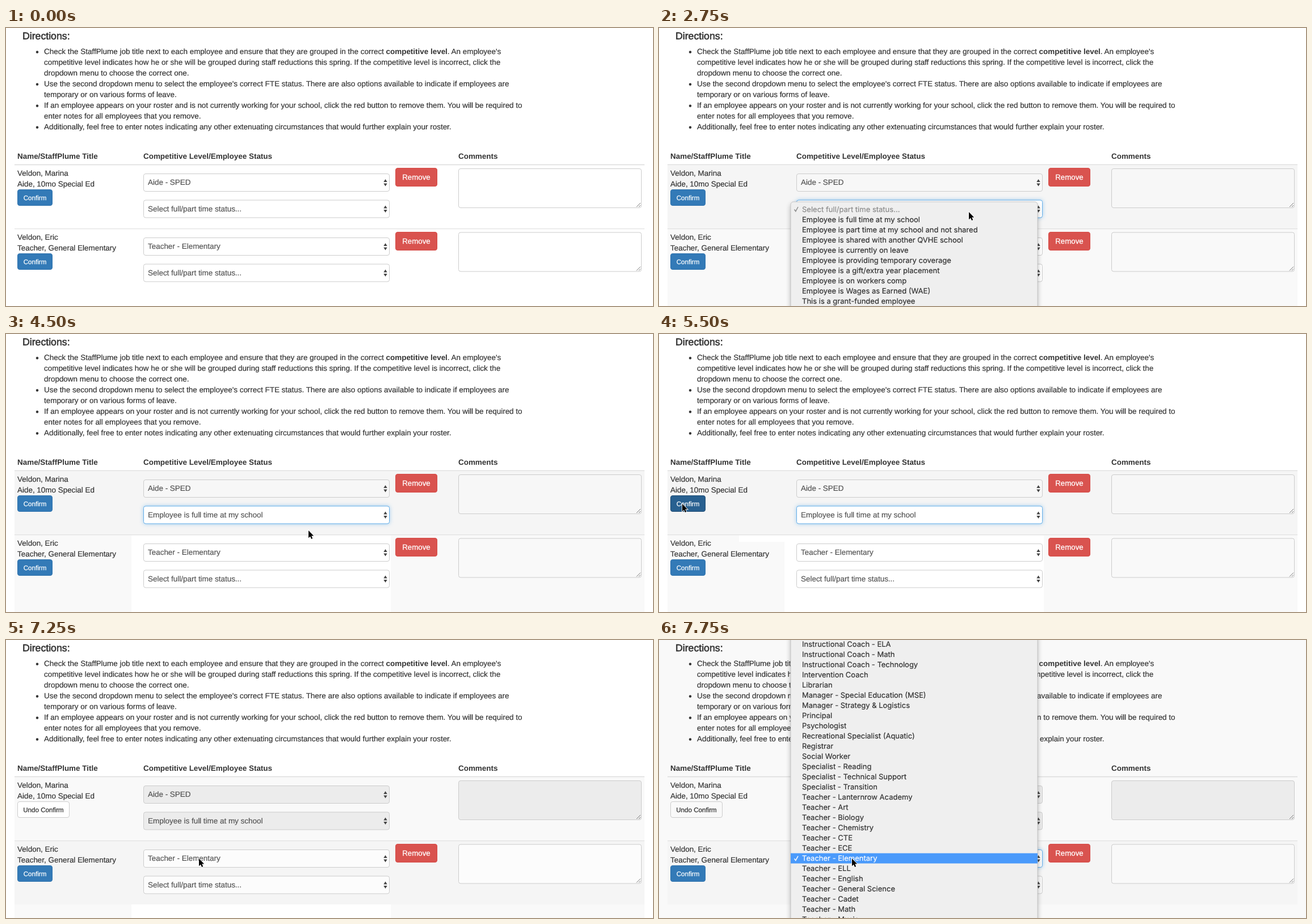
An HTML page for the animation above (8000 ms loop, 1140 by 491 pixels).

```html
<!DOCTYPE html>
<html lang="en">
<head>
<meta charset="utf-8">
<title>Roster review</title>
<style>
  html, body { margin: 0; width: 100%; height: 100%; overflow: hidden; background: #fff; }
  svg { display: block; width: 1140px; height: 491px; }
  text {
    font: 13.44px "Liberation Sans", Arial, sans-serif; white-space: pre; text-rendering: geometricPrecision;
    color: #333; fill: currentColor; stroke: currentColor; stroke-width: .2px;
  }
  .bold { font-weight: 700; stroke-width: 0; }
  .title { font-size: 17.7px; stroke-width: .6px; }
  .field { color: #555; }
  .button { font-size: 13.3px; stroke-width: .3px; }
  .small { font-size: 11.6px; stroke-width: .25px; }
  .option { font: 13px Inter, Roboto, sans-serif; }
</style>
</head>
<body>
<svg id="stage" viewBox="0 0 1140 491" xmlns="http://www.w3.org/2000/svg">
  <defs>
    <filter id="glow" x="-10%" y="-100%" width="120%" height="300%"><feGaussianBlur stdDeviation="3.5"/></filter>
    <filter id="shade" x="-10%" y="-10%" width="120%" height="120%"><feGaussianBlur stdDeviation="5"/></filter>
  </defs>
  <g id="scene"></g>
  <g id="pointer">
    <path d="M0 0V13.2L3 10.4 5 15 7.2 14 5.2 9.6H9.2Z" fill="#000" stroke="#fff" stroke-width="1.6" paint-order="stroke"/>
  </g>
</svg>
<script>
const LOOP = 8000, STEP = 250;
const scene = document.getElementById('scene');
const pointer = document.getElementById('pointer');

const directions = [
  '*Check the StaffPlume job title next to each employee and ensure that they are grouped in the correct <tspan class="bold">competitive level</tspan>. An employee\'s',
  'competitive level indicates how he or she will be grouped during staff reductions this spring. If the competitive level is incorrect, click the',
  'dropdown menu to choose the correct one.',
  '*Use the second dropdown menu to select the employee\'s correct FTE status. There are also options available to indicate if employees are',
  'temporary or on various forms of leave.',
  '*If an employee appears on your roster and is not currently working for your school, click the red button to remove them. You will be required to',
  'enter notes for all employees that you remove.',
  '*Additionally, feel free to enter notes indicating any other extenuating circumstances that would further explain your roster.'
];

const UNSET = 'Select full/part time status...';
const FULL_TIME = 'Employee is full time at my school';
const statuses = [
  UNSET, FULL_TIME,
  'Employee is part time at my school and not shared',
  'Employee is shared with another QVHE school',
  'Employee is currently on leave',
  'Employee is providing temporary coverage',
  'Employee is a gift/extra year placement',
  'Employee is on workers comp',
  'Employee is Wages as Earned (WAE)',
  'This is a grant-funded employee'
];
const subjects = ['Lanternrow Academy', 'Art', 'Biology', 'Chemistry', 'CTE', 'ECE', 'Elementary',
  'ELL', 'English', 'General Science', 'Cadet', 'Math', 'Music'];
const levels = [
  'Instructional Coach - ELA', 'Instructional Coach - Math', 'Instructional Coach - Technology',
  'Intervention Coach', 'Librarian', 'Manager - Special Education (MSE)',
  'Manager - Strategy &amp; Logistics', 'Principal', 'Psychologist',
  'Recreational Specialist (Aquatic)', 'Registrar', 'Social Worker', 'Specialist - Reading',
  'Specialist - Technical Support', 'Specialist - Transition',
  ...subjects.map(name => 'Teacher - ' + name)
];
const CHOSEN_LEVEL = levels.indexOf('Teacher - Elementary');

// [start ms, tip x, tip y]
const pointerStops = [
  [750, 603, 120], [1000, 551, 304], [1250, 546, 325], [3500, 537, 336], [3750, 533, 347],
  [4750, 394, 350], [5000, 143, 343], [5250, 50, 307], [5500, 41, 300], [6250, 51, 300],
  [6500, 198, 297], [6750, 310, 326], [7000, 338, 380], [7250, 340, 386]
];

const rect = (x, y, w, h, fill, more = '') =>
  `<rect x="${x}" y="${y}" width="${w}" height="${h}" fill="${fill}" ${more}/>`;
const box = (x, y, w, h, fill, stroke) =>
  rect(x + .5, y + .5, w - 1, h - 1, fill, `rx="3.5" stroke="${stroke}"`);
const label = (x, y, text, cls = '', more = '') =>
  `<text x="${x}" y="${y}" class="${cls}" ${more}>${text}</text>`;
const button = (x, y, w, h, text, fill, stroke, ink, cls) =>
  box(x, y, w, h, fill, stroke) +
  label(x + w / 2, y + h / 2 + 4, text, cls, `text-anchor="middle" style="color:${ink}"`);
const blueButton = (y, hover) => hover
  ? button(20, y, 62, 29, 'Confirm', '#286090', '#204d74', '#fff', 'small')
  : button(20, y, 62, 29, 'Confirm', '#337ab7', '#3073ae', '#fff', 'small');
const removeButton = y =>
  button(686, y, 74, 33, 'Remove', '#d9534f', '#d74b47', '#fff', 'button');

function select(y, text, fill, focused) {
  const halo = focused
    ? rect(242, y, 434, 32, '#66afe9', 'rx="4" opacity=".6" filter="url(#glow)"') : '';
  return halo + box(242, y, 434, 32, fill, focused ? '#66afe9' : '#ccc') +
    label(250, y + 20, text, 'field') +
    `<path d="M665.3 ${y + 15}h6.4l-3.2-5zm0 2.4h6.4l-3.2 5z" fill="#444"/>`;
}

function comments(y, fill) {
  return box(797, y, 323, 70, fill, '#ccc') +
    `<path d="M1111 ${y + 68}l7-7m-3 7l3-3" stroke="#777" fill="none"/>`;
}

function tick(y, color) {
  return `<path d="M238.5 ${y + .5}l2.3 3.3 4.2-7.8" fill="none" stroke="${color}" stroke-width="1.5"/>`;
}

function menu(top, firstY, items, checked, lit, muted) {
  const rows = items.map((text, i) => {
    const y = firstY + 18 * i;
    const ink = i === lit ? '#fff' : i === muted ? '#8c8c8c' : '#333';
    return (i === lit ? rect(232, y - 9, 435, 18, '#4a9afb') : '') +
      (i === checked ? tick(y, ink) : '') +
      label(252, y + 4.5, text, 'option', `style="color:${ink}"`);
  }).join('');
  return rect(232, top + 4, 435, 520, '#000', 'rx="5" opacity=".28" filter="url(#shade)"') +
    rect(232, top, 435, 520, '#efefef', 'rx="5" stroke="#bdbdbd" stroke-width=".8"') + rows;
}

function header() {
  const lines = directions.map((line, i) => {
    const y = 42 + 19 * i;
    const dot = line[0] === '*' ? `<circle cx="55" cy="${y + .5}" r="2.2" fill="#333"/>` : '';
    return dot + label(67, y + 4.2, line.replace('*', ''));
  }).join('');
  return label(29, 20, 'Directions:', 'title') + lines +
    label(20, 231, 'Name/StaffPlume Title', 'bold') +
    label(242, 231, 'Competitive Level/Employee Status', 'bold') +
    label(797, 231, 'Comments', 'bold') +
    rect(15, 240.7, 1110, 1.6, '#ddd');
}

function backdrop(t) {
  if (t < 2750) return '';
  if (t >= 7500) return rect(0, 0, 1140, 491, '#f9f9f9') + rect(15, 355, 1110, 112, '#f5f5f5');
  const late = t >= 7000;
  let out = rect(15, 243, 1110, 112, late ? '#f9f9f9' : '#f5f5f5') +
    rect(15, 355, 1110, 136, '#f9f9f9');
  if (t >= 4250) out += rect(221, 356, 457, 135, '#fff');
  if (t >= 5000 && !late) out += rect(141, 356, 80, 11, '#fff');
  if (late) out += rect(15, 355, 1110, 112, '#f5f5f5');
  return out;
}

function confirmButton(t) {
  if (t < 5750) return blueButton(285, t >= 5250);
  const hover = t < 6500;
  const rest = t < 7500 ? '#fff' : '#f9f9f9';
  return button(20, 285, 92, 29, 'Undo Confirm', hover ? '#e6e6e6' : rest,
    hover ? '#adadad' : '#ccc', '#333', 'small');
}

function firstRow(t) {
  const locked = t >= 5750;
  const idle = t < 2750 ? '#fff' : '#f7f7f7';
  const focused = t >= 2750 && !locked;
  return label(20, 261.2, 'Veldon, Marina') + label(20, 280.2, 'Aide, 10mo Special Ed') +
    confirmButton(t) +
    select(257, 'Aide - SPED', locked ? '#ececec' : idle) +
    select(303.5, t < 4250 ? UNSET : FULL_TIME, locked ? '#ececec' : '#fff', focused) +
    (locked ? '' : removeButton(247)) +
    comments(248, t >= 6000 ? '#ececec' : idle);
}

function secondRow(t) {
  const settled = t < 7500 ? '#fcfcfc' : '#f9f9f9';
  const paper = t < 2750 ? '#fff' : t < 7000 ? '#f9f9f9' : settled;
  const fill = t < 7000 ? '#fff' : settled;
  return rect(15, 354.2, 1110, 1, '#ddd') +
    label(20, 374.2, 'Veldon, Eric') + label(20, 393.2, 'Teacher, General Elementary') +
    blueButton(398) +
    select(370, 'Teacher - Elementary', fill, t >= 7750) +
    select(416.5, UNSET, fill) +
    removeButton(360) + comments(360.5, paper);
}

function menus(t) {
  if (t >= 2750 && t < 4250) return menu(307, 320, statuses, 0, t >= 3500 ? 1 : -1, 0);
  if (t >= 7500) return menu(-12, 7.6, levels, CHOSEN_LEVEL, t >= 7750 ? CHOSEN_LEVEL : -1, -1);
  return '';
}

function draw(t) {
  scene.innerHTML = backdrop(t) + header() + firstRow(t) + secondRow(t) + menus(t);
  const stop = pointerStops.filter(([start]) => start <= t).pop();
  pointer.setAttribute('visibility', stop ? 'visible' : 'hidden');
  if (stop) pointer.setAttribute('transform', `translate(${stop[1]} ${stop[2]})`);
}

let shown = -1;
const origin = performance.now();
function tickFrame() {
  const t = (performance.now() - origin) % LOOP;
  const step = Math.floor(t / STEP) * STEP;
  if (step !== shown) draw(shown = step);
  requestAnimationFrame(tickFrame);
}
tickFrame();
</script>
</body>
</html>
```
